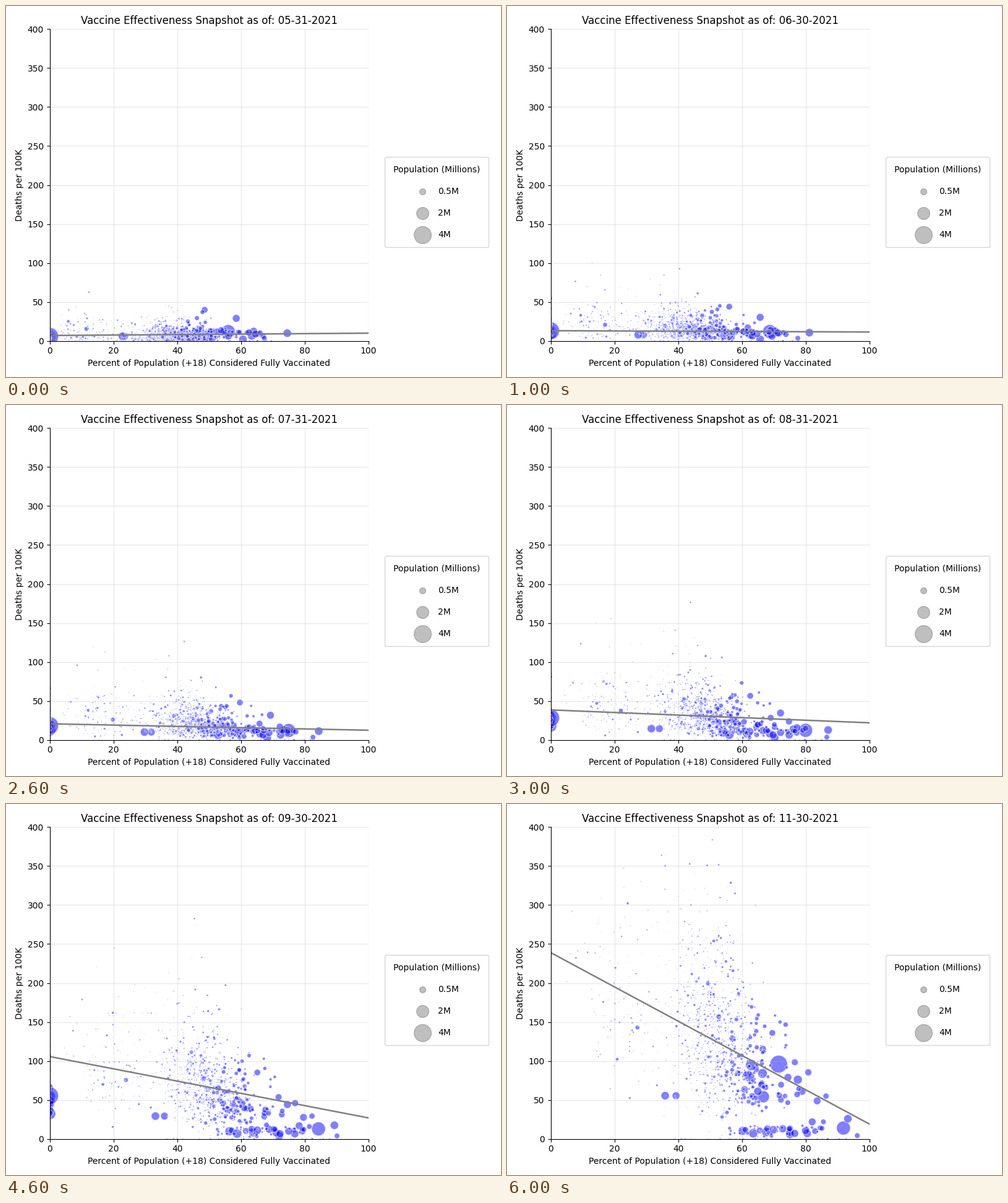
Write a matplotlib script that moves like this. It is 800 px wide and 600 px high and loops after 7 s.

```python
import numpy as np
import matplotlib.pyplot as plt
from matplotlib.animation import FuncAnimation

DPI = 100
EDGE = 1.0
plt.rcParams["font.family"] = "DejaVu Sans"
rng = np.random.default_rng(5)

MONTHS = np.arange("2021-06", "2022-01", dtype="datetime64[M]")
ENDS = MONTHS.astype("datetime64[D]") - 1
t = np.arange(ENDS.size)
LATE_START = 5

# A slow drift plus one steep wave; the rest of the motion follows from it
surge = 1 / (1 + np.exp(-2.1 * (t - 4.25)))
surge = (surge - surge[0]) / (surge[-1] - surge[0])
trend_left = 7 + 6 * t + 196 * surge
trend_right = [10, 11.5, 12.5, 22, 27, 14, 19]
wave = (trend_left - trend_left[0]) / np.ptp(trend_left)

DEATHS = wave ** .88
LATE_DEATHS = wave ** .7
UPTAKE = (t / t[-1]) ** .58
SLOW_UPTAKE = (t / t[-1]) ** .8

xs, ys, sizes = [], [], []


def area(d):
    return (np.asarray(d, float) * 72 / DPI + EDGE) ** 2


def ease(a, b, curve):
    a, b = np.broadcast_arrays(np.asarray(a, float), np.asarray(b, float))
    return a[:, None] + (b - a)[:, None] * curve


def add(x, y, s):
    xs.append(x)
    ys.append(np.maximum(y, 0))
    sizes.append(s)


def late_x(x):
    """Zero until the first report, then near the last value."""
    path = ease(x, x, UPTAKE)
    path[:, :LATE_START] = 0
    path[:, LATE_START] -= 1.5
    return path


def varied(curve, n):
    return curve ** rng.lognormal(-.15, .3, n)[:, None]


def small_areas(x, mid):
    s = rng.lognormal(np.log(mid) + (x - 50) / 16, .95)
    return np.clip(s, .35, 40)


def deaths_for(x, shape):
    mean = np.maximum(250 - 2.2 * x, 45)
    return mean * rng.gamma(shape, 1 / shape, x.size)


def add_landmarks():
    # diameter, x first, x last, y first, y last
    rows = [(21, 56, 91.8, 12, 14), (12, 74.5, 93.2, 10, 26),
            (11, 58.5, 78.8, 29, 61), (9, 48.6, 69.5, 40, 136),
            (11, 23.5, 39.3, 6, 55.5), (12, 22.8, 35.9, 6, 55.5),
            (12, 60.6, 75, 2, 6), (6, 11.5, 27.2, 15.5, 143)]
    d, x0, x1, y0, y1 = np.array(rows).T
    add(ease(x0, x1, UPTAKE), ease(y0, y1, DEATHS), area(d))


def add_steady(n):
    x = np.linspace(61, 83, n) + rng.normal(0, 1, n)
    y = rng.uniform(7, 14, n)
    add(ease(x - rng.uniform(17, 24, n), x, UPTAKE),
        ease(y * .9, y, DEATHS), area(rng.uniform(6, 14, n)))


def add_rising(n):
    x = np.linspace(56, 87, n) + rng.normal(0, 1.5, n)
    y = np.clip(225 - 2.2 * x + rng.normal(0, 22, n), 22, 190)
    add(ease(x - rng.uniform(18, 25, n), x, UPTAKE),
        ease(rng.uniform(6, 15, n), y, DEATHS), area(rng.uniform(6, 11, n)))


def add_late_large(n):
    d = 18 * .92 ** np.arange(n)
    x = rng.uniform(62, 80, n)
    y = rng.uniform(38, 122, n)
    x, y, d = np.append(x, 71.5), np.append(y, 96), np.append(d, 27)
    add(late_x(x), ease(6, y, LATE_DEATHS), area(d))


def add_main(n):
    x = rng.normal(51, 7.5, n)
    x0 = x * .72 + rng.normal(0, 3.5, n)
    y = ease(rng.gamma(1.2, 7, n), deaths_for(x, 4.5), varied(DEATHS, n))
    add(ease(x0, x, SLOW_UPTAKE), y, small_areas(x, 1.8))


def add_low(n):
    x = np.clip(rng.normal(23, 7.5, n), 5, 42)
    x0 = x * rng.uniform(.2, .85, n)
    y = ease(rng.gamma(1.3, 11, n), rng.gamma(8, 22, n), varied(DEATHS, n))
    add(ease(x0, x, SLOW_UPTAKE), y,
        np.clip(rng.lognormal(.3, .9, n), .35, 14))


def add_late_small(n):
    x = rng.normal(48, 7.5, n)
    y = ease(rng.gamma(1.2, 7, n), deaths_for(x, 6) * 1.2,
             varied(LATE_DEATHS, n))
    add(late_x(x), y, small_areas(x, 1.4))


def add_mid(n):
    x = rng.normal(64, 5, n)
    y = ease(rng.gamma(1.8, 4, n), rng.gamma(6, 16, n), varied(DEATHS, n))
    add(ease(x - rng.uniform(15, 22, n), x, UPTAKE), y,
        area(rng.uniform(2.5, 5.5, n)))


def add_flat(n):
    x = rng.normal(68, 8, n)
    y = rng.uniform(3, 17, n)
    add(ease(x * .7, x, UPTAKE), ease(y * .8, y, DEATHS),
        small_areas(x, 2))


def add_zero(n):
    x = rng.uniform(36, 93, n)
    add(ease(x * .75, x, UPTAKE), np.zeros((n, t.size)),
        rng.uniform(.6, 5, n))


add_landmarks()
add_steady(17)
add_rising(22)
add_late_large(9)
add_main(820)
add_low(140)
add_late_small(170)
add_mid(45)
add_flat(45)
add_zero(28)
xs, ys, sizes = np.vstack(xs), np.vstack(ys), np.concatenate(sizes)

fig, ax = plt.subplots(figsize=(8, 6), dpi=DPI)
ax.set(xlim=(0, 100), ylim=(0, 400), ylabel="Deaths per 100K",
       xlabel="Percent of Population (+18) Considered Fully Vaccinated")
ax.spines[["top", "right"]].set_visible(False)
ax.grid(alpha=.25, linewidth=1)
dots = ax.scatter(xs[:, 0], ys[:, 0], s=sizes, c="blue", alpha=.5,
                  edgecolors="white", linewidths=EDGE)
trend, = ax.plot([0, 100], [0, 0], color="gray", linewidth=1.8)
title = ax.set_title("")


def update(i):
    year, month, day = str(ENDS[i]).split("-")
    title.set_text("Vaccine Effectiveness Snapshot as of: "
                   f"{month}-{day}-{year}")
    dots.set_offsets(np.column_stack([xs[:, i], ys[:, i]]))
    trend.set_ydata([trend_left[i], trend_right[i]])
    return dots, trend, title


for millions in (.5, 2, 4):
    ax.scatter([], [], s=100 * millions, c="gray", alpha=.5,
               linewidths=1, label=f"{millions}M")
ax.legend(title="Population (Millions)", loc="lower left",
          bbox_to_anchor=(1.05, .3), borderaxespad=0, borderpad=1,
          labelspacing=1.5, scatterpoints=1)
update(0)
fig.tight_layout()

anim = FuncAnimation(fig, update, frames=t.size, interval=1000,
                     repeat=True, blit=False)
plt.show()
```
